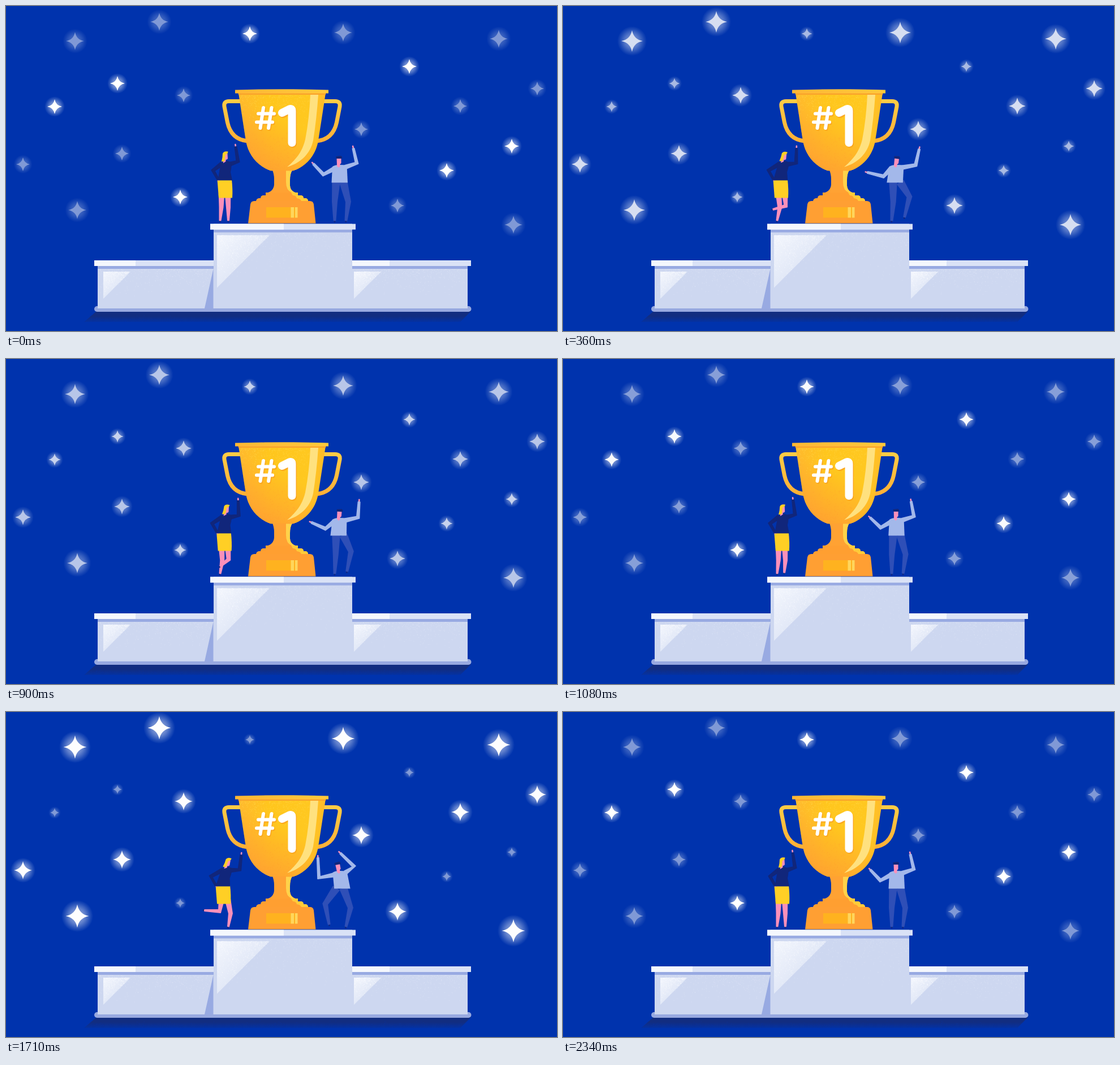
Recreate the animation shown at these times as an HTML page. Size 974 px wide and 575 px high, loop 2.43 s.

```html
<!DOCTYPE html>
<html lang="en">
<head>
<meta charset="utf-8">
<title>Number one</title>
<style>
html, body { margin: 0; width: 100%; height: 100%; overflow: hidden; background: #0033ad; }
svg { display: block; width: 100vw; height: 100vh; }
</style>
</head>
<body>
<svg viewBox="0 0 974 575" role="img" aria-label="#1 trophy on a podium">
  <defs>
    <radialGradient id="halo">
      <stop offset="0" stop-color="#fff" stop-opacity=".65"/>
      <stop offset=".5" stop-color="#fff" stop-opacity=".38"/>
      <stop offset=".8" stop-color="#fff" stop-opacity=".14"/>
      <stop offset="1" stop-color="#fff" stop-opacity="0"/>
    </radialGradient>
    <linearGradient id="gold">
      <stop offset="0" stop-color="#ffb92e"/>
      <stop offset=".35" stop-color="#ffc61d"/>
      <stop offset=".8" stop-color="#ffc820"/>
      <stop offset="1" stop-color="#ffbb2a"/>
    </linearGradient>
    <linearGradient id="rim">
      <stop offset="0" stop-color="#ffb734"/>
      <stop offset="1" stop-color="#ffc93c"/>
    </linearGradient>
    <linearGradient id="warm" x1=".15" y1="1" x2=".5" y2=".35">
      <stop offset="0" stop-color="#ff9f33"/>
      <stop offset="1" stop-color="#ff9f33" stop-opacity="0"/>
    </linearGradient>
    <linearGradient id="handle" x2="0" y2="1">
      <stop offset="0" stop-color="#ffcb45"/>
      <stop offset="1" stop-color="#ffb036"/>
    </linearGradient>
    <linearGradient id="shine" x2=".6" y2=".6">
      <stop offset="0" stop-color="#f3f6fd"/>
      <stop offset="1" stop-color="#dfe6f6"/>
    </linearGradient>
    <linearGradient id="shade" x2="0" y2="1">
      <stop offset=".45" stop-color="#122d80"/>
      <stop offset="1" stop-color="#122d80" stop-opacity=".25"/>
    </linearGradient>
    <clipPath id="bowlClip"><path id="bowl" d="M411 154Q418 200 424 238C428 262 442 280 464 290H512C534 280 548 262 552 238Q558 200 565 154Z"/></clipPath>
    <path id="one" d="M488 189L501 182.500Q505.500 180.500 505.500 186V242" stroke-width="14"/>
    <path id="hash" d="M455 180L449.500 216M469.500 180L464 216M446 190.500H474M443 205.500H471" stroke-width="6"/>
    <path id="grip" d="M414 168.500H394Q384.500 168.500 386 178L391.500 206Q398 236 427 239"/>
  </defs>

  <rect width="974" height="575" fill="#0033ad"/>
  <g id="stars"></g>
  <g id="podium">
    <path d="M160 540H822L803 559H138Z" fill="url(#shade)"/>
    <rect x="156" y="531" width="666.500" height="10" rx="5" fill="#98a9e0"/>
  </g>

  <g id="trophy">
    <g fill="none" stroke="url(#handle)" stroke-width="7">
      <use href="#grip"/>
      <use href="#grip" transform="matrix(-1 0 0 1 976 0)"/>
    </g>
    <path d="M470 288H506Q502 297 502 308V318Q503 328 514 331H460Q473 328 474 316V306Q474 297 470 288Z" fill="#ffa233"/>
    <path d="M495 291H506Q502 297 502 308V318Q503 328 512 330H505Q495 326 495 312Z" fill="#ffd24a"/>
    <path d="M459 330H516V335H522Q526 336 526 340H530Q534 341 534 346H442Q442 341 447 340H450Q450 336 454 335H459Z" fill="#ff9f31"/>
    <path d="M504 330H516V335H522Q526 336 526 340H530Q534 341 534 345H522Q521 341 514 340Q513 335 507 335Z" fill="#ffcb3a"/>
    <path d="M439 345H537Q543 345 544 351L547.500 384.500H428L432 351Q433 345 439 345Z" fill="#ff9f33"/>
    <path d="M460 356H515V374.500H460Z" fill="#ffb21f"/>
    <path d="M503.500 356H509V374.500H503.500ZM511 356H515.500V374.500H511Z" fill="#ffd65c"/>
    <path d="M463 284H512V288Q511 291.500 507 291.500H468Q464 291 463 287Z" fill="#ffa52f"/>
    <use href="#bowl" fill="url(#gold)"/>
    <use href="#bowl" fill="url(#warm)"/>
    <g id="bowlGrain" clip-path="url(#bowlClip)"></g>
    <path d="M538 157H552Q549 200 543 238C538 262 520 278 497 285C512 272 524 258 529 236Q536 200 538 157Z" fill="#ffe17f"/>
    <path d="M410.500 154H565.500L565 157H411Z" fill="#f9a42c"/>
    <path d="M405 148.500Q487 146 570 148.500V154.500H405Z" fill="url(#rim)"/>
    <g fill="none" stroke-linecap="round" stroke-linejoin="round">
      <g stroke="#faa821" transform="translate(1.500 2)"><use href="#hash"/><use href="#one"/></g>
      <g stroke="#fff"><use href="#hash"/><use href="#one"/></g>
    </g>
  </g>
  <g id="people"></g>
</svg>
<script>
const STEP = 90, LOOP = 2430, CYCLE = 1170;
const NAVY = '#11267b', PINK = '#fb90ba', YELLOW = '#ffcf25', SKY = '#a3b8ea', DENIM = '#2f4fb7';
const [stars, podium, people, bowlGrain] = ['stars', 'podium', 'people', 'bowlGrain'].map(id => document.getElementById(id));
const parts = [];

function el(tag, attrs, parent) {
  const node = document.createElementNS('http://www.w3.org/2000/svg', tag);
  for (const k in attrs) node.setAttribute(k, attrs[k]);
  return parent.appendChild(node);
}
const fill = (color, d, parent) => el('path', { d, fill: color }, parent);

// Seeded speckle, thinning out away from the starting edge
let seed = 7;
const rnd = () => (seed = seed * 16807 % 2147483647) / 2147483647;
function grain(parent, count, x, y, w, h, color, inside = () => true) {
  let d = '';
  for (let i = 0; i < count; i++) {
    const u = rnd(), v = rnd() * rnd();
    if (inside(u, v)) d += `M${(x + u * w).toFixed(1)} ${(y + v * h).toFixed(1)}h1`;
  }
  el('path', { d, stroke: color, 'stroke-opacity': .5 }, parent);
}

// One podium step: body, slab with overhangs, lit slab part, corner shine
function step(x, w, y, left, right, lit, inset, size) {
  const rect = (color, rx, ry, rw, rh) => fill(color, `M${rx} ${ry}h${rw}v${rh}h${-rw}z`, podium);
  const sx = x + inset, sy = y + 20;
  rect('#cdd7f0', x, y, w, 535 - y);
  rect('#98aae2', x, y + 10, w, 5);
  rect('#dae2f6', x - left, y, w + left + right, 10);
  rect('#f4f7fd', x - left, y, lit, 10);
  grain(podium, w * 2, x + 2, y + 16, w - 4, size, '#e3e9f8');
  fill('url(#shine)', `M${sx} ${sy}h${size}l${-size} ${size}z`, podium);
  grain(podium, size * 5, sx, sy, size, size, '#fff', (u, v) => u + v < 1);
}
step(162, 205, 450, 6, 0, 73, 10, 48);
step(612, 204, 450, 0, 6, 66, 3, 48);
fill('#98aae2', 'M366.500 465V535H351Z', podium);
step(367, 245, 385.5, 6, 6, 130, 6, 93);
grain(podium, 300, 145, 559, 660, -14, '#0033ad');
grain(bowlGrain, 350, 412, 158, 125, 60, '#ffdc55');
grain(bowlGrain, 350, 420, 288, 90, -90, '#ffa02f');

// Stars of one size class; level maps the swing to brightness
function twinkle(points, r, low, level) {
  for (const [x, y] of points) {
    const g = el('g', {}, stars);
    el('circle', { r: 1.38, fill: 'url(#halo)' }, g);
    fill('#fff', 'M0-1Q.16-.16 1 0Q.16.16 0 1Q-.16.16-1 0Q-.16-.16 0-1Z', g);
    parts.push(({ e }) => {
      const k = level(e);
      g.setAttribute('transform', `translate(${x} ${y}) scale(${r * (low + (1 - low) * k)})`);
      g.setAttribute('opacity', .5 + .5 * k);
    });
  }
}
const rising = e => e, falling = e => 1 - e;
twinkle([[122, 62], [271, 28], [596, 47], [871, 58], [126, 361], [897, 387]], 20.5, .77, rising);
twinkle([[314, 158], [939, 146], [803, 177], [628, 218], [30, 280], [205, 261], [692, 353]], 16, .75, rising);
twinkle([[431, 49], [197, 137], [86, 178], [713, 107], [894, 248], [779, 291], [308, 338]], 13, .6, falling);

// Tapered outline around start, joint and end
function taper(p, w) {
  const n = [0, 2, 4].map(i => {
    const a = Math.max(0, i - 2), b = Math.min(4, i + 2);
    const dx = p[b] - p[a], dy = p[b + 1] - p[a + 1], s = w[i / 2] / 2 / Math.hypot(dx, dy);
    return [-dy * s, dx * s];
  });
  const at = (i, s) => `${(p[2 * i] + s * n[i][0]).toFixed(2)} ${(p[2 * i + 1] + s * n[i][1]).toFixed(2)}`;
  return `M${at(0, 1)}L${at(1, 1)}L${at(2, 1)}L${at(2, -1)}L${at(1, -1)}L${at(0, -1)}Z`;
}

// pose returns start, joint and end for the current swing; tip colours hand or shoe
function limb(color, tip, widths, reach, pose) {
  const end = el('path', { stroke: tip, 'stroke-width': 2.6, 'stroke-linecap': 'round' }, people);
  const body = el('path', { fill: color, stroke: color, 'stroke-width': 1.5, 'stroke-linejoin': 'round' }, people);
  parts.push(m => {
    const p = pose(m), dx = p[4] - p[2], dy = p[5] - p[3], k = reach / Math.hypot(dx, dy);
    body.setAttribute('d', taper(p, widths));
    end.setAttribute('d', `M${p[4]} ${p[5]}l${dx * k} ${dy * k}`);
  });
}

// dir is the swing direction in which this leg lifts
function leg(color, widths, dir, hip, y, knee, foot, lift) {
  limb(color, NAVY, widths, 2, ({ s }) => {
    const up = Math.max(0, dir * s), down = Math.max(0, -dir * s);
    const [kx, ky, fx, fy] = lift;
    return [hip, y, knee + kx * up + 4 * down, (y + 381) / 2 - ky * up, foot + fx * up, 379.5 - fy * up];
  });
}

function art(transform, ...layers) {
  const g = el('g', {}, people);
  for (const [color, d] of layers) fill(color, d, g);
  parts.push(m => g.setAttribute('transform', transform(m)));
}
const skew = (y, a) => `translate(0 ${y}) skewX(${a}) translate(0 ${-y})`;

// s swings -1..1 (second half negative), e is its size
const sleeve = [7, 6, 3.5], shin = [9, 6.5, 2.5], trouser = [13, 8.5, 3.5];

leg(PINK, shin, -1, 381, 332, 380.5, 378.5, [-3, 4, -28, 29]);
leg(PINK, shin, 1, 392, 332, 393, 393, [1, 4, -32, 29]);
art(({ e }) => `translate(${-3 * e} 0)`, [YELLOW, 'M373.500 307H399Q401 324 400 339.500H376Z']);
limb(NAVY, PINK, sleeve, 1.5, ({ e }) => [382 + 2 * e, 279, 366 - 4 * e, 291, 375 - 4 * e, 307]);
limb(NAVY, PINK, sleeve, 4, ({ e }) => [395 + 2 * e, 280, 410 + 3 * e, 275 + 4 * e, 406 + 10 * e, 249 + 4 * e]);
art(({ e }) => skew(286, -10 * e), [NAVY, 'M380 278Q383 275 389 273L397 276Q400 280 397 294L400 308.500H374.500L377 293Z']);
art(({ e }) => `translate(${2 * e} 0) rotate(${14 * e} 387 276)`,
  [PINK, 'M384 261H391.500L392 270Q391 272 388.500 272V275L384 278Z'],
  [YELLOW, 'M381 275Q383 268 383 261Q385 256 392.500 257.500Q392 262 388 263Q387 270 387 273Q384 276 381 275Z']);

leg(DENIM, trouser, -1, 583.5, 312, 581, 581, [-17, 7, -10, 4]);
leg(DENIM, trouser, 1, 596.5, 312, 605, 601, [11, 13, 4, 9]);
limb(SKY, PINK, sleeve, 3.5, ({ s }) => [580 - s, 288, 561 + 8 * s, 298 + 5 * s, 543.5 - 8 * s, 279.5 + 22 * s]);
limb(SKY, PINK, sleeve, 4, ({ s }) => [600, 285 + s, 620 + 5 * s, 278 + 5 * s, 614 + 23 * s, 252 + 2 * s]);
art(({ s }) => skew(281, -8.5 * s), [SKY, 'M577 284Q582 281 589 281Q598 281 602.500 282L604 312.500H575.500Z']);
art(({ s }) => `rotate(${11 * s} 588 282)`,
  [PINK, 'M584.500 268H592.500V278L590.500 280V284L588 286L585 283Z'],
  [NAVY, 'M583.500 270V266L592 265L594 267V270Z']);

function frame() {
  const t = Math.floor(performance.now() % LOOP / STEP) * STEP;
  const e = (1 - Math.cos(2 * Math.PI * t / CYCLE)) / 2;
  const s = t < CYCLE ? e : -e;
  for (const draw of parts) draw({ e, s });
  requestAnimationFrame(frame);
}
frame();
</script>
</body>
</html>
```
